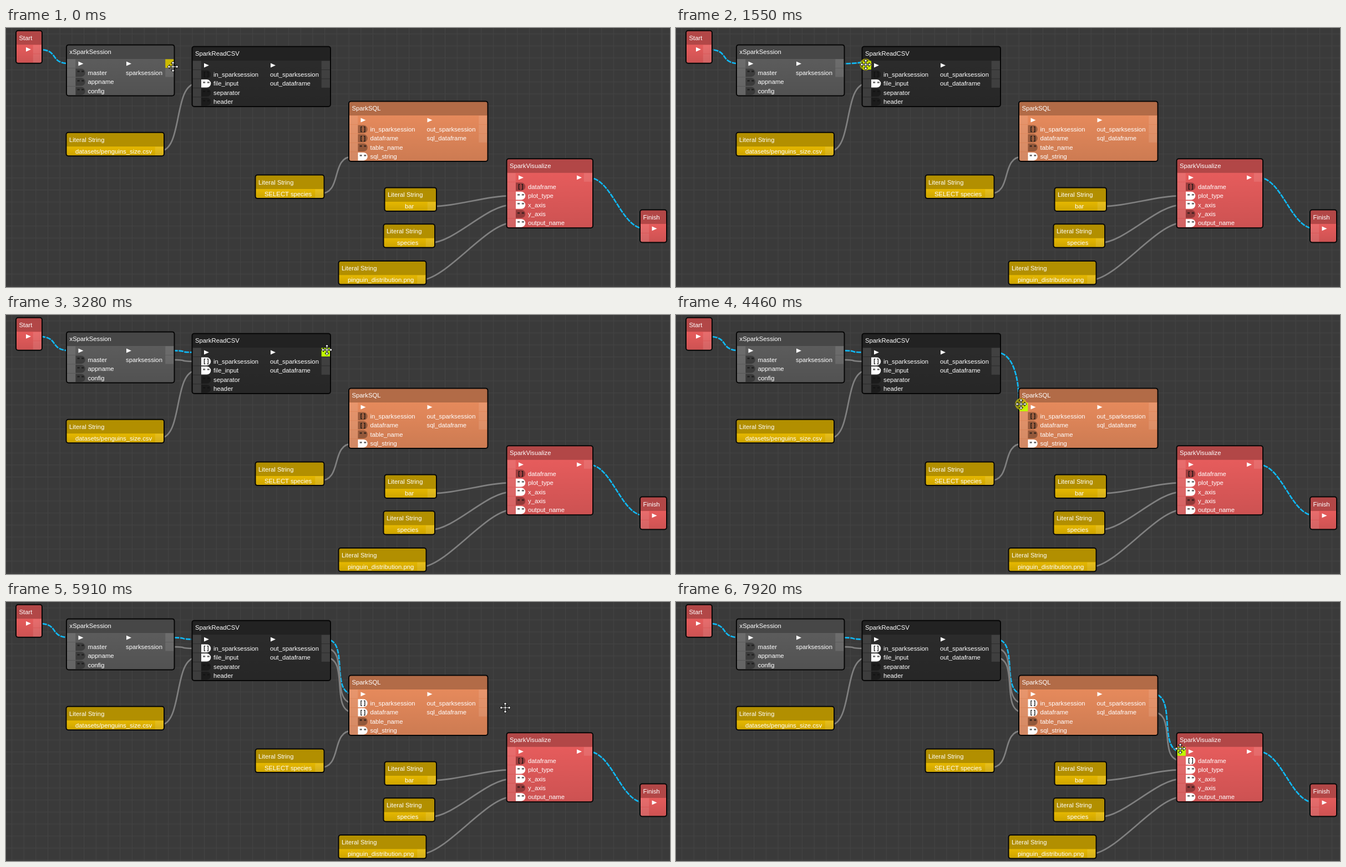
Write an HTML page that moves like this. It is 1197x468 px and loops after 7990 ms.

```html
<!DOCTYPE html>
<html lang="en">
<head>
<meta charset="utf-8">
<title>Workflow canvas</title>
<style>
  html, body { margin: 0; width: 100%; height: 100%; overflow: hidden; background: #3a3a3a; }
  svg { display: block; width: 1197px; height: 468px; }
  text { font: 11.3px "Liberation Sans", Arial, sans-serif; fill: #fff; white-space: pre; }
  .icon { font-size: 10px; font-weight: bold; text-anchor: middle; }
  .link { fill: none; stroke: #808080; stroke-width: 2.7; }
  .flow { stroke: #10b9f6; stroke-dasharray: 8.7 1.7; }
</style>
</head>
<body>
<svg id="stage" viewBox="0 0 1197 468">
  <defs>
    <pattern id="grid" width="21.7" height="21.7" patternUnits="userSpaceOnUse">
      <path d="M10.5 0V21.7M0 10.5H21.7" stroke="#fff" stroke-opacity=".05"/>
    </pattern>
    <linearGradient id="shade" x2="0" y2="1">
      <stop stop-opacity=".1"/><stop offset="1" stop-opacity=".2"/>
    </linearGradient>
  </defs>
  <rect width="1197" height="468" fill="#3a3a3a"/>
  <rect width="1197" height="468" fill="url(#grid)"/>
  <g id="links"></g>
  <g id="nodes"></g>
  <g id="pointer"></g>
</svg>
<script>
const LOOP = 7990, ROW = 16.45, FIRST = 35, BEND = 43.5;
const RED = 'rgb(255,102,102)', GOLD = 'rgb(255,204,0)', ORANGE = 'rgb(255,153,102)';
const byId = id => document.getElementById(id);

function add(parent, tag, attrs, text) {
  const el = document.createElementNS('http://www.w3.org/2000/svg', tag);
  for (const key in attrs) el.setAttribute(key, attrs[key]);
  if (text) el.textContent = text;
  parent.appendChild(el);
  return el;
}

// Port labels: '>' is a flow arrow, '' a bare port; a leading '[' or '"' picks the type icon.
const nodes = {
  start: { x: 17, y: 3.7, r: 66, color: RED, title: 'Start', outs: ['>', ''], outX: 35 },
  session: { x: 108, y: 29.4, r: 304.5, color: 'rgb(102,102,102)', title: 'xSparkSession',
    ins: ['>', '"master', '"appname', '"config'], outs: ['>', 'sparksession'], outX: 216 },
  read: { x: 334.5, y: 32.4, r: 586, color: 'rgb(48,48,48)', title: 'SparkReadCSV',
    ins: ['>', '[in_sparksession', '"file_input', '"separator', '"header'],
    outs: ['>', 'out_sparksession', 'out_dataframe'], outX: 476 },
  sql: { x: 617, y: 131.4, r: 869.5, color: ORANGE, title: 'SparkSQL',
    ins: ['>', '[in_sparksession', '[dataframe', '"table_name', '"sql_string'],
    outs: ['>', 'out_sparksession', 'sql_dataframe'], outX: 758.5 },
  plot: { x: 901.5, y: 235.2, r: 1059, color: RED, title: 'SparkVisualize',
    ins: ['>', '[dataframe', '"plot_type', '"x_axis', '"y_axis', '"output_name'], outs: ['>'], outX: 1028 },
  finish: { x: 1142, y: 327.5, r: 1192, color: RED, title: 'Finish', ins: ['>', ''] },
  file: literal(107.5, 187.7, 286, 125, 'datasets/penguins_size.csv'),
  query: literal(448.5, 264.6, 574.5, 466, 'SELECT species'),
  kind: literal(681.5, 287.4, 777, 719, 'bar'),
  axis: literal(679.5, 353.2, 774, 705, 'species'),
  output: literal(598.5, 420, 758.5, 616, 'pinguin_distribution.png')
};

function literal(x, y, r, outX, value) {
  return { x, y, r, color: GOLD, title: 'Literal String', outs: [value], outX };
}

const rowY = (node, row) => node.y + FIRST + ROW * row;
const outPoint = (name, row) => [nodes[name].r - 9.5, rowY(nodes[name], row)];
const inPoint = (name, row) => [nodes[name].x + 9.5, rowY(nodes[name], row)];

const ports = [], icons = {};

function drawPort(g, x, y) {
  const el = add(g, 'rect', { x, y: y - 8, width: 15.3, height: 15.6 });
  ports.push({ x, y, el });
}

function drawLabel(g, label, x, y) {
  if (label === '>') add(g, 'path', { d: `M${x + 1} ${y - 4}l9 4l-9 4z`, fill: '#fff' });
  else add(g, 'text', { x, y: y + 4 }, label);
}

function drawIcon(g, type, x, y) {
  const plate = add(g, 'path', { d: `M${x} ${y - 7.3}h10a7.3 7.3 0 0 1 0 14.6h-10z` });
  add(g, 'text', { class: 'icon', x: x + 9, y: y + (type === '[' ? 3.3 : 4.5), style: 'fill:#111' },
    type === '[' ? '[ ]' : '" "');
  return plate;
}

function drawNode(name) {
  const n = nodes[name], g = add(byId('nodes'), 'g', {});
  const ins = n.ins || [], outs = n.outs || [];
  const w = n.r - n.x, h = 28 + 16.5 * Math.max(ins.length, outs.length);
  add(g, 'rect', { x: n.x + 1, y: n.y + 1, width: w - 2, height: h - 2, rx: 4, fill: n.color });
  add(g, 'rect', { x: n.x + 1, y: n.y + 1, width: w - 2, height: 25.5, rx: 2, 'fill-opacity': .3 });
  add(g, 'rect', { x: n.x + 1, y: n.y + 26.5, width: w - 2, height: h - 27.5, fill: 'url(#shade)' });
  add(g, 'text', { x: n.x + 6.5, y: n.y + 18 }, n.title);
  ins.forEach((label, row) => {
    const y = rowY(n, row);
    drawPort(g, n.x + 2, y);
    if (label === '>') drawLabel(g, label, n.x + 21.5, y);
    else if (label) {
      icons[name + row] = drawIcon(g, label[0], n.x + 17.5, y);
      drawLabel(g, label.slice(1), n.x + 39.5, y);
    }
  });
  outs.forEach((label, row) => {
    const y = rowY(n, row);
    drawPort(g, n.r - 17.3, y);
    if (label) drawLabel(g, label, n.outX, y);
  });
  add(g, 'rect', { x: n.x + 1, y: n.y + 1, width: w - 2, height: h - 2, rx: 4,
    fill: 'none', stroke: '#060606', 'stroke-width': 2 });
}

Object.keys(nodes).forEach(drawNode);

// from, row, to, row, press time, release time
const links = [
  ['start', 0, 'session', 0], ['file', 0, 'read', 2], ['query', 0, 'sql', 4],
  ['kind', 0, 'plot', 2], ['axis', 0, 'plot', 3], ['output', 0, 'plot', 5], ['plot', 0, 'finish', 0],
  ['session', 0, 'read', 0, 450, 1640], ['session', 1, 'read', 1, 1860, 2230],
  ['read', 0, 'sql', 0, 3450, 4580], ['read', 1, 'sql', 1, 4790, 5090], ['read', 2, 'sql', 2, 5270, 5570],
  ['sql', 0, 'plot', 0, 6380, 7130], ['sql', 2, 'plot', 1, 7350, 7700]
].map(([from, outRow, to, inRow, press = -1, release = -1]) => {
  const flow = nodes[from].outs[outRow] === '>';
  return {
    a: outPoint(from, outRow), b: inPoint(to, inRow), press, release, flow, icon: icons[to + inRow],
    el: add(byId('links'), 'path', { class: flow ? 'link flow' : 'link' })
  };
});

// time, x, y
const route = [
  [0, 301, 70], [450, 298, 68], [700, 300, 67], [1400, 342, 66], [1640, 342, 66],
  [1840, 295, 82], [1880, 295, 82], [2200, 344, 84], [2240, 344, 84],
  [2480, 430, 36], [2640, 500, 35], [3100, 579, 62], [3480, 578, 64],
  [4300, 622, 161], [4580, 622, 161], [4760, 577, 84], [4810, 577, 84],
  [5050, 626, 182], [5100, 626, 182], [5250, 577, 101], [5290, 577, 101],
  [5520, 626, 198], [5580, 626, 198], [5910, 900, 191], [6240, 861, 166], [6420, 861, 166],
  [6810, 894, 209], [7060, 910, 268], [7140, 910, 268], [7320, 861, 200], [7370, 861, 200],
  [7650, 911, 286], [7710, 911, 286], [7900, 909, 265], [LOOP, 909, 265]
];

function cursorAt(t) {
  const i = Math.max(1, route.findIndex(p => p[0] > t));
  const [t0, x0, y0] = route[i - 1], [t1, x1, y1] = route[i];
  const u = (t - t0) / (t1 - t0), k = u * u * (3 - 2 * u);
  return [x0 + (x1 - x0) * k, y0 + (y1 - y0) * k];
}

const pointer = byId('pointer');
const press = add(pointer, 'circle', { r: 10.7, fill: '#d7d200', 'fill-opacity': .62 });
const arm = [[-1, -1], [-1, -6], [-3.6, -6], [0, -9.8], [3.6, -6], [1, -6]];
const cross = [];
for (let turn = 0, pts = arm; turn < 4; turn++, pts = pts.map(([x, y]) => [-y, x])) cross.push(...pts);
add(pointer, 'polygon', { points: cross.join(' '), fill: '#fff', stroke: '#000', 'stroke-width': 1 });

function curve([x0, y0], [x1, y1], pull) {
  return `M${x0} ${y0}C${x0 + BEND} ${y0} ${x1 - pull} ${y1} ${x1} ${y1}`;
}

function render(t) {
  const [cx, cy] = cursorAt(t);
  let dragging = false;
  for (const link of links) {
    const active = t >= link.press && t < link.release;
    const joined = t >= link.release;
    dragging = dragging || active;
    link.el.style.display = active || joined ? '' : 'none';
    link.el.setAttribute('d', joined ? curve(link.a, link.b, BEND) : curve(link.a, [cx - 4, cy - 6], 0));
    if (link.flow) link.el.setAttribute('stroke-dashoffset', 20.8 * (1 - t / 1000 % 1));
  }
  for (const key in icons) {
    const filled = links.some(l => l.icon === icons[key] && t >= l.release);
    icons[key].setAttribute('fill', filled ? '#fff' : 'rgba(0,0,0,.3)');
  }
  for (const p of ports) {
    const hover = cx >= p.x && cx < p.x + 15.3 && Math.abs(cy - p.y) < 8;
    p.el.setAttribute('fill', !hover ? 'rgba(255,255,255,.1)' : t < 1000 ? '#cdbb00' : '#c0ff00');
  }
  press.style.display = dragging ? '' : 'none';
  pointer.setAttribute('transform', `translate(${cx} ${cy})`);
}

const began = performance.now();
function tick() {
  render((performance.now() - began) % LOOP);
  requestAnimationFrame(tick);
}
tick();
</script>
</body>
</html>
```
